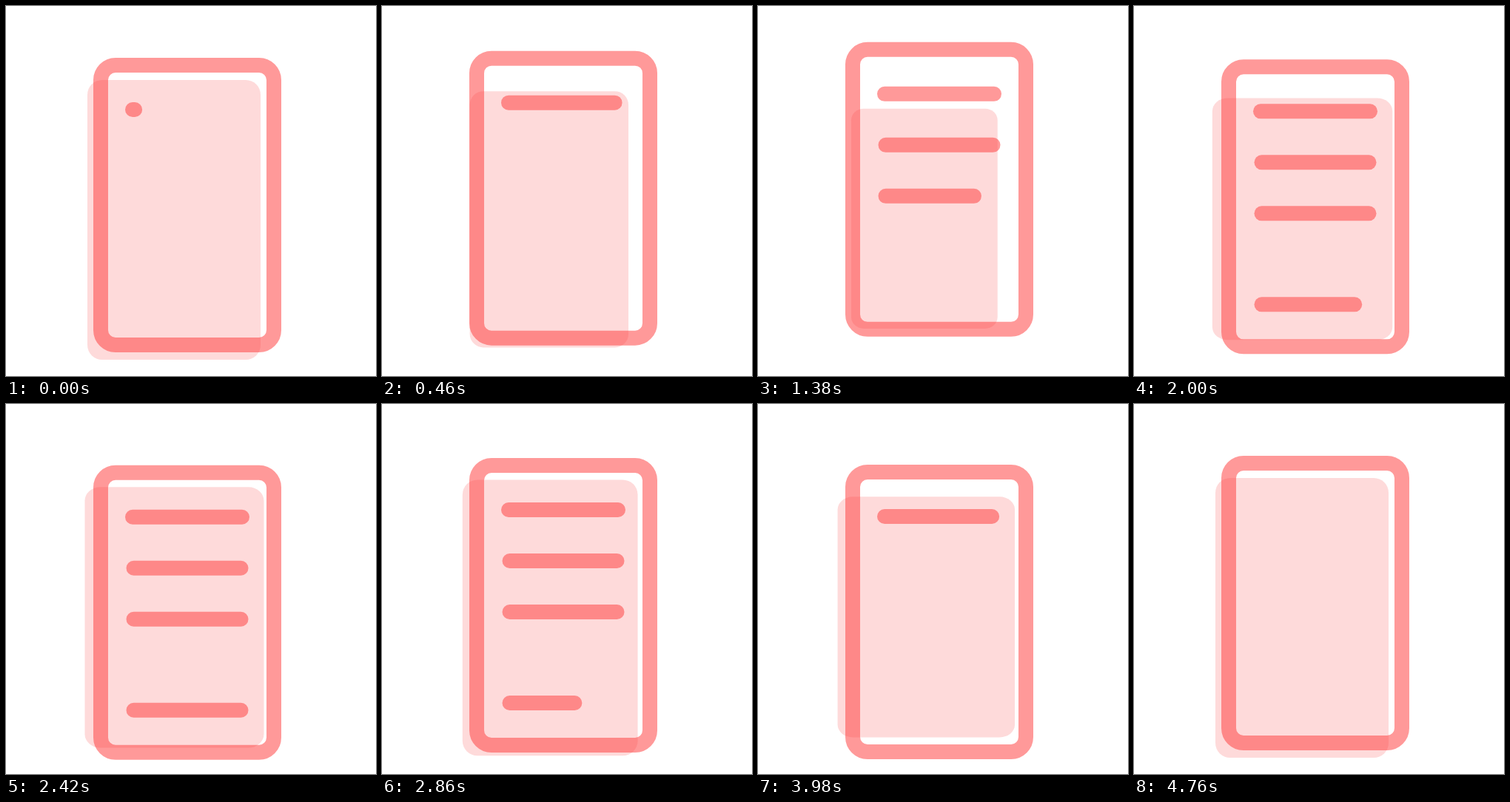
An HTML page with a canvas for the animation above (4800 ms loop, 500 by 500 pixels).

```html
<!DOCTYPE html>
<html lang="en">
<head>
<meta charset="utf-8">
<title>Writing page</title>
<style>
  html, body { margin: 0; width: 100%; height: 100%; overflow: hidden; background: #fff; }
  canvas { display: block; width: 500px; height: 500px; }
</style>
</head>
<body>
<canvas id="stage" width="500" height="500"></canvas>
<script>
const LOOP = 4800, END = 4760;
const SMALL = 1110, REST = 3180;   // card smallest, then back at full size
const WRITE = 520, ERASE = 422, ERASE_START = 2680;
const HOLD = 40;                   // the pen waits as a dot before it moves
const ctx = document.getElementById('stage').getContext('2d');

function smooth(p) {
  p = Math.min(1, Math.max(0, p));
  return p * p * (3 - 2 * p);
}

// Eases between turning points; a bend below 1 makes the move start faster.
function path(from, ...moves) {
  return t => {
    let start = 0, value = from;
    for (const { end, to, bend = 1 } of moves) {
      const p = Math.min(1, Math.max(0, (t - start) / (end - start)));
      value += (to - value) * smooth(p ** bend);
      if (t < end) break;
      start = end;
    }
    return value;
  };
}

const pageTop = path(70,
  { end: SMALL, to: 45 },
  { end: 2480, to: 83 },
  { end: REST, to: 70, bend: 0.62 },
  { end: 4060, to: 82.3 },
  { end: END, to: 70, bend: 0.62 });
const cardScaleX = path(1,
  { end: SMALL, to: 0.776 },
  { end: 2000, to: 1.04, bend: 0.92 },
  { end: REST, to: 1, bend: 1.4 },
  { end: 3980, to: 1.0235 },
  { end: END, to: 1 });
const cardScaleY = path(1,
  { end: SMALL, to: 0.776 },
  { end: REST, to: 1 },
  { end: 3980, to: 0.86 },
  { end: END, to: 1 });

const lines = [
  { x: 171, y: 70, write: -5 },
  { x: 172.5, y: 139, write: 500 },
  { x: 172.5, y: 208, write: 1000 },
  { x: 172.5, y: 331, write: 1600 }
];

// Lines are erased one after another, from the last to the first.
function drawLine({ x, y, write }, index, t) {
  const erase = ERASE_START + (lines.length - 1 - index) * ERASE;
  const shown = smooth((t - write) / WRITE) - smooth((t - erase) / ERASE);
  if (shown <= 0) return;
  ctx.beginPath();
  ctx.moveTo(x, y);
  ctx.lineTo(x + 2 * (245 - x) * shown, y);
  ctx.stroke();
}

function drawPage(t) {
  ctx.save();
  ctx.translate(0, pageTop(t));
  ctx.strokeStyle = '#ff9999';
  ctx.lineWidth = 20;
  ctx.lineCap = 'round';
  ctx.beginPath();
  ctx.roundRect(128, 10, 234, 378, 20);
  ctx.stroke();
  lines.forEach((line, i) => drawLine(line, i, Math.max(t, HOLD)));
  ctx.restore();
}

function drawCard(t) {
  ctx.save();
  ctx.translate(213, 281);
  ctx.scale(cardScaleX(t), cardScaleY(t));
  ctx.fillStyle = 'rgba(250, 70, 70, 0.197)';
  ctx.beginPath();
  ctx.roundRect(-103, -181, 234, 378, 20);
  ctx.fill();
  ctx.restore();
}

function draw(t) {
  ctx.fillStyle = '#fff';
  ctx.fillRect(0, 0, 500, 500);
  drawPage(t);
  drawCard(t);
}

const start = performance.now();
function tick() {
  draw((performance.now() - start) % LOOP);
  requestAnimationFrame(tick);
}
tick();
</script>
</body>
</html>
```
